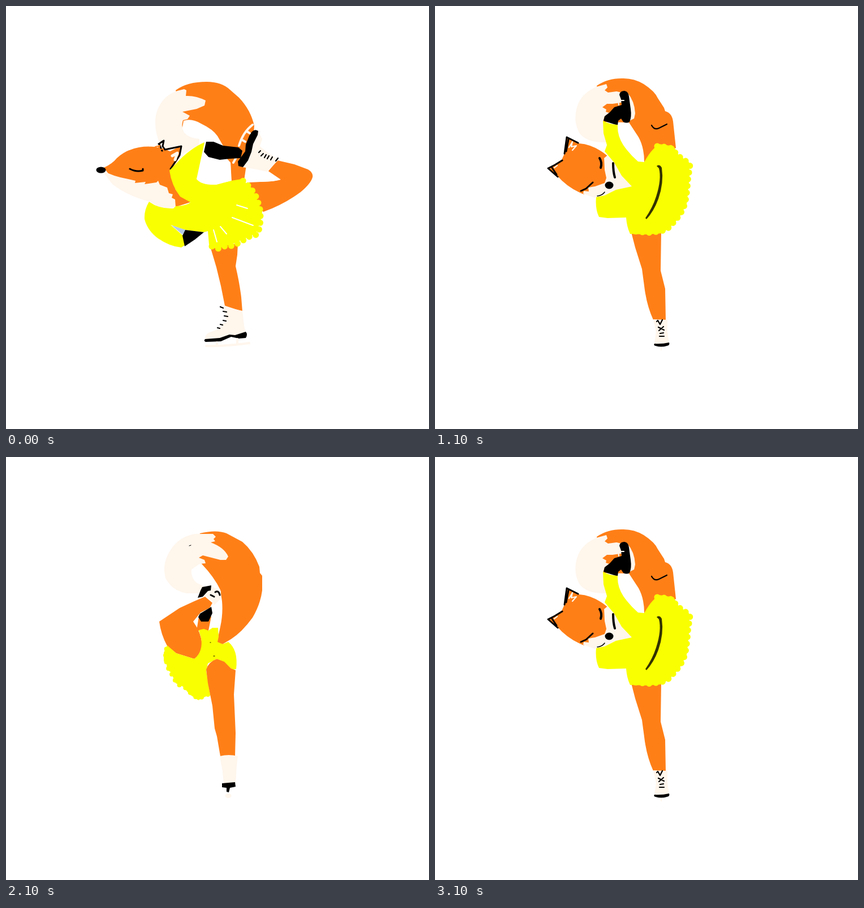
An HTML page for the animation above (3.2 s loop, 748 by 748 pixels).

```html
<!DOCTYPE html>
<html lang="en">
<head>
<meta charset="utf-8">
<title>Skating fox</title>
<style>
  html, body { margin: 0; width: 100%; height: 100%; overflow: hidden; background: #fff; }
  svg { display: block; width: 100vw; height: 100vh; }
  path { stroke-linejoin: round; stroke-linecap: round; }
  .orange { fill: #ff7f17; }
  .cream { fill: #fff6ec; }
  .yellow { fill: #f9ff00; }
  .white { fill: #fff; }
  .ink { fill: none; stroke: #000; stroke-width: 3; }
  .blade { fill: none; stroke: #fff6ec; stroke-width: 5; }
  .pleat { fill: none; stroke: #fff; stroke-width: 2; }
  .frill { fill: none; stroke: #f9ff00; stroke-width: 11; stroke-dasharray: 0 12; }
  .hair { stroke-width: 1.5; }
  .thin { stroke-width: 2.2; }
  .bold { stroke-width: 4; }

  /* Four views of the spin, one after another */
  .view { visibility: hidden; animation: turn 400ms step-end infinite; animation-delay: calc((var(--i) - 4) * 100ms); }
  @keyframes turn { 0% { visibility: visible; } 25%, 100% { visibility: hidden; } }
</style>
</head>
<body>
<svg viewBox="0 0 748 748">
  <defs>
    <g id="side">
      <!-- tail -->
      <path class="orange" d="M300 149Q320 134 355 134Q381 134 396 148L412 162Q433 184 439 212L437 235L424 288L421 309L399 310L397 277L384 262L350 238L340 236L311 215L310 180Z"/>
      <path class="white" d="M314 203Q328 198 345 208Q366 218 374 230L385 249L365 244L350 240L330 240L311 220Z"/>
      <path class="cream" d="M315 147L319 149L318 159Q335 158 353 167L351 176L337 182L312 187L325 194L321 200L313 202Q309 213 315 224Q324 234 342 235L341 246L312 262L306 248L282 254L272 243Q261 218 265 193Q273 160 303 150Z"/>
      <!-- raised leg -->
      <path class="orange" d="M480 273L510 280L534 289Q544 295 542 303Q539 314 521 329Q491 351 455 364L430 340V312L470 310L486 307L464 292Z"/>
      <path class="white" d="M421 309L425 288L450 290Q467 294 485 307Q475 311 440 311Z"/>
      <path class="cream" d="M445 220L453 235L449 248L460 257L482 272L474 280L462 293L438 288L418 285L430 265L436 245Z"/>
      <path d="M446 221Q437 215 430 230L424 245L423 257L410 275L411 283L419 285L428 273L434 258L437 244L445 228Z"/>
      <path class="blade bold" d="M436 210Q419 223 412 247M431 225L425 221M423 240L416 236M407 268L402 277"/>
      <path class="ink thin" d="M447 259L450 256M451 265L455 261M457 268L460 263M462 270L465 265M468 272L471 267M477 274L481 269"/>
      <!-- standing leg -->
      <path class="orange" d="M361 425L410 420L409 440L406 460Q413 490 416 515L418 540L387 530L380 495L372 462Z"/>
      <path class="cream" d="M384 529L400 535L418 539L421 565L424 579L390 587L354 592Q349 584 358 578L376 571L389 556Z"/>
      <path d="M352 589L378 587L395 581L405 582L424 576Q428 581 424 587L412 588L398 585L380 593L353 594Q349 592 352 589Z"/>
      <path class="blade bold" d="M354 601Q390 602 430 596M373 595V600M409 589V597"/>
      <path class="ink thin" d="M379 532L384 534M384 540L390 541M386 548L392 549M384 556L389 557M379 563L383 564M374 569L378 570"/>
      <!-- head -->
      <path class="orange" d="M173 286Q188 279 196 269Q212 254 235 250Q264 245 290 257L310 247L307 267L290 293L300 325L326 347L301 355L240 330L190 308Z"/>
      <path class="cream" d="M169 290Q188 301 216 306L229 309L228 313L247 311L245 315L266 312L269 309L272 316L285 321L288 331L295 333L293 339L299 342L300 356L275 358L254 346Q215 336 188 315Z"/>
      <ellipse cx="168" cy="290" rx="8.500" ry="5.500"/>
      <path class="ink" d="M219 288Q230 294 242 291L242 288M270 244L279 238L277 248L281 254L310 248L307 264L291 288M271 244L276 256"/>
      <path class="blade" d="M294 265L303 260L299 272"/>
      <path class="thin" fill="none" stroke="#ff7f17" d="M264 249L272 247L268 254L278 253"/>
      <!-- dress -->
      <path class="yellow" d="M351 241Q332 249 312 267L289 291Q293 318 308 337L326 347Q321 353 300 354L296 358Q270 359 253 346Q244 361 245 377Q250 397 269 411Q289 425 310 427L316 423L314 407L291 387L317 396L350 400L357 398L359 421L363 429L380 427L402 420L425 410L442 402L450 380L453 364L446 348L436 323L424 313L423 305L398 309Q360 319 337 306Z"/>
      <path class="white" d="M352 263L337 306Q345 317 372 316L398 309L397 277L380 272Z"/>
      <path class="frill" d="M364 425L376 429L389 424L402 424L415 417L430 408L444 404L449 391L450 377L450 363L446 348L441 334L431 320L419 309"/>
      <path class="pleat" d="M408 352L427 358M400 374L437 388M379 390L390 403M367 396L373 417"/>
      <path fill="#b5cbe5" d="M293 388L318 396L312 404Z"/>
      <path d="M317 396L350 400L334 413L316 425L312 406Z"/>
      <path d="M354 240L367 240L384 247L411 250L418 256L415 269L396 270L378 272L358 267L350 258Z"/>
    </g>
  </defs>

  <use class="view" style="--i:0" href="#side"/>

  <g class="view" style="--i:1">
    <!-- tail -->
    <path class="orange" d="M343 135Q372 128 390 135L418 150Q438 167 448 194L449 205L453 210V236Q450 260 436 284Q417 310 398 322L383 331L373 328L379 300Q384 277 382 255L379 235Q368 212 346 189L335 170Z"/>
    <path class="cream" d="M366 136L371 141L367 145L370 149L362 151Q386 160 393 176L389 182L379 182L348 174L341 178L351 182L353 188L342 189L328 199Q327 215 338 223L355 231L344 241L320 241Q294 237 282 214Q275 187 292 163Q306 141 334 136Z"/>
    <!-- arm and raised leg -->
    <path class="orange" d="M341 282H363L358 307H337Z"/>
    <path class="orange" d="M271 291L307 267L333 255L352 247L365 258L360 267L344 275L331 291Q345 310 347 332Q344 350 333 357L301 347L285 334Q274 314 271 291Z"/>
    <path class="cream" d="M360 227L380 237L380 250L368 262L364 254L351 246Z"/>
    <path d="M347 230L363 227L362 236L357 237L348 247L339 249L344 236Z"/>
    <path class="ink" d="M362 244L368 247M370 239Q376 235 378 244"/>
    <path d="M343 277L363 265L365 276L358 291L345 291L340 283Z"/>
    <!-- skirt -->
    <path class="yellow" d="M341 306L350 304L358 307L365 302L375 302L376 318L374 327L383 331L393 327Q411 341 407 375L400 376L385 362L373 357L357 365L354 378L361 420L350 425L340 430L325 420L313 406L300 400L292 381L285 376L284 366L279 361L279 346L285 333L301 347L333 357Q349 344 345 320Z"/>
    <path class="frill" style="stroke-width:8" d="M357 420L348 424L339 427L327 418L317 408L302 401L295 387L288 377L285 366L282 358L282 341L288 336"/>
    <!-- standing leg -->
    <path class="orange" d="M373 357L386 362L398 374L406 377L403 420L406 488L405 529H379L373 494L369 480L365 440L357 400L354 376Q358 362 373 357Z"/>
    <path class="cream" d="M378 529Q394 525 410 529L408 545L406 577H385L383 556Z"/>
    <path d="M382 577L405 575L406 583L396 585L394 593L390 592V585L382 584Z"/>
    <ellipse class="cream" cx="393" cy="599" rx="5.500" ry="4"/>
    <path class="ink" style="stroke-width:1" d="M324 157L327 156M361 328H362M367 352H369"/>
  </g>

  <use class="view" style="--i:2" href="#side" transform="matrix(-.92 0 0 1 724.200 0)"/>

  <g class="view" style="--i:3">
    <!-- tail and held leg -->
    <path class="orange" d="M286 141Q305 128 330 128Q351 127 369 138Q389 151 394 163L405 180L407 186Q419 189 421 204L426 251L400 263L370 276Q370 250 360 232L343 206L295 205L290 175Z"/>
    <path class="cream" d="M303 138L305 144L300 149L306 153L321 151L334 154L334 170L314 173L304 173L296 179L303 183L302 187L308 189L300 195L297 205L302 241Q267 242 255 224Q244 203 251 179Q258 155 285 143Z"/>
    <path class="cream" d="M340 153Q353 168 354 190L352 199L344 203Z"/>
    <path d="M326 157Q327 150 335 150Q342 151 343 160L346 182Q348 196 344 205Q339 208 333 205L329 199L324 203L323 211L298 203L300 195L309 188L317 179L330 175L329 165Z"/>
    <path class="blade thin" d="M324 163L325 175M328 167L334 167"/>
    <path class="ink thin" d="M383 211Q388 220 396 216L410 209"/>
    <!-- head -->
    <path class="orange" d="M200 287L224 272L229 261L233 232L255 243Q281 245 305 265L320 300L300 320L263 333Q235 322 216 300Z"/>
    <path class="cream" d="M299 269L305 264L316 276L330 300L348 319L320 325L300 336L282 339L262 332L263 327L272 328L271 321L283 319L300 313L303 304L300 290Z"/>
    <path class="blade thin" d="M237 250L243 240L241 249L250 247L243 255M211 286L216 282"/>
    <path class="ink" d="M217 302L200 287L212 281L225 273M229 261L233 232L253 242M232 257L236 236M207 286L215 298"/>
    <path class="ink bold" d="M291 269Q296 277 293 286M315 278Q315 293 318 303"/>
    <path class="ink" d="M258 327L267 323L279 312"/>
    <path class="ink hair" d="M287 336Q296 335 300 329"/>
    <ellipse cx="308" cy="317" rx="7.500" ry="6.500"/>
    <!-- standing leg -->
    <path class="orange" d="M347 400H400L399 468L407 500L408 555H386Q374 529 370 495L366 465L354 427Z"/>
    <path class="cream" d="M386 554L411 555V576L414 597H388L391 576Z"/>
    <path d="M388 597Q401 598 414 595Q416 600 410 601Q400 604 390 601Q386 600 388 597Z"/>
    <path class="blade thin" d="M400 604V608"/>
    <path class="ink thin" d="M392 558L394 556L398 563L402 555M395 568L405 573M396 574L404 567M398 579L404 578M397 584L405 584"/>
    <!-- dress -->
    <path class="yellow" d="M297 203Q310 210 323 210Q322 229 333 246Q344 262 359 275L370 276Q382 254 396 244L422 248L431 264L449 276L450 300L447 333L445 350L432 374L414 393L400 402L375 404L345 403Q339 390 338 374L305 375L290 373Q283 359 285 338L300 335L320 325L348 319L330 300L317 277L300 257L304 246L298 225Z"/>
    <path class="frill" d="M393 248L406 249L420 252L428 264L442 273L451 281L449 295L447 309L446 325L443 345L439 359L430 373L418 387L409 396L393 399L376 401L360 399L347 398"/>
    <path fill="#333300" d="M392 283Q397 279 401 286Q405 313 395 341Q387 363 374 377L372 375Q385 356 391 337Q401 306 396 287Z"/>
  </g>
</svg>
</body>
</html>
```
